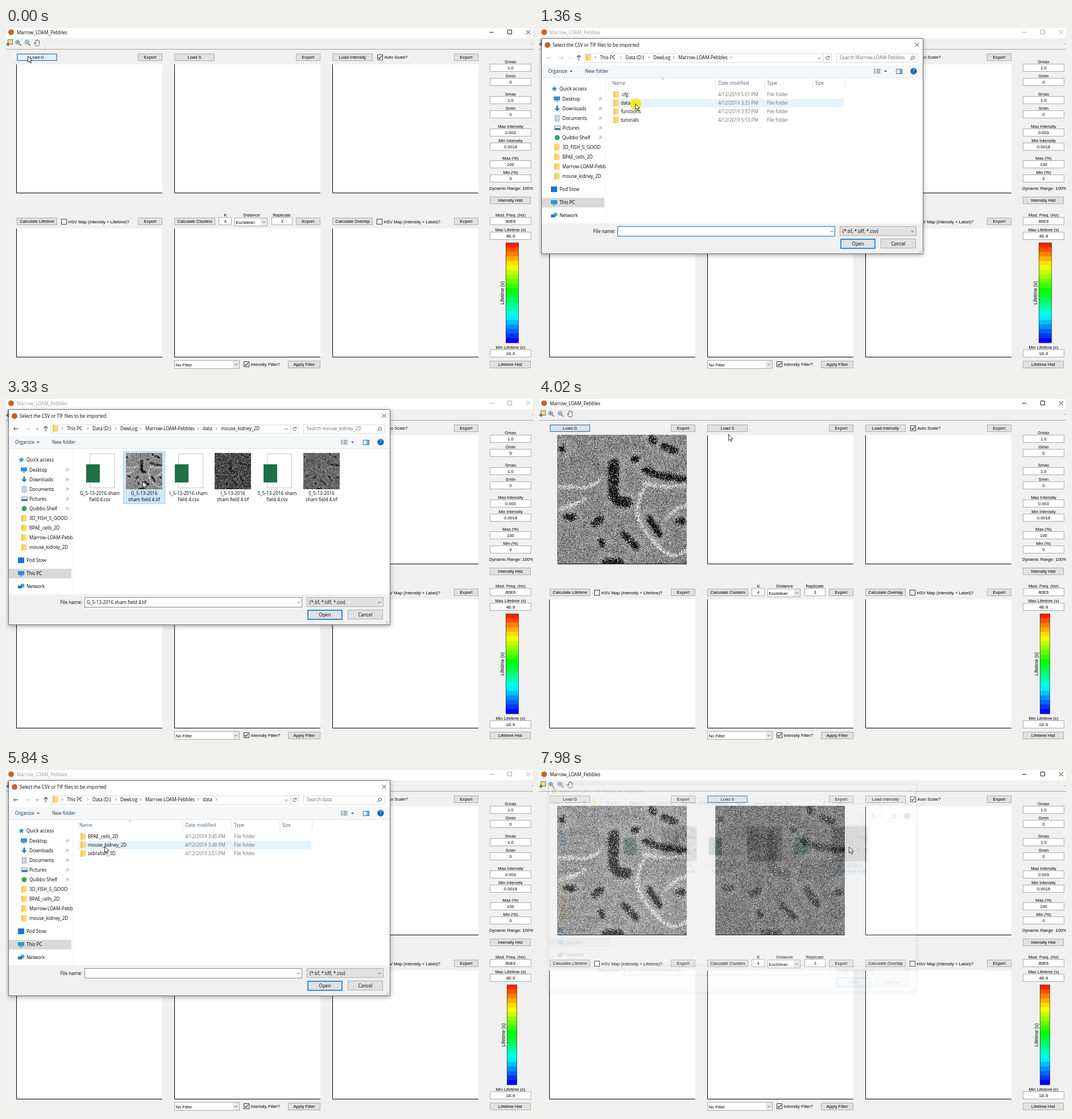
Write an HTML page with a canvas that moves like this. It is 927 px wide and 604 px high and loops after 8000 ms.

```html
<!DOCTYPE html>
<html lang="en">
<head>
<meta charset="utf-8">
<title>Image loader</title>
<style>
html, body { margin: 0; width: 100%; height: 100%; overflow: hidden; background: #f0f0f0; }
#stage { position: relative; width: 927px; height: 604px; overflow: hidden; background: #f0f0f0; }
svg, canvas, #dialog { position: absolute; left: 0; top: 0; }
svg { width: 927px; height: 604px; }
text { white-space: pre; }
.a { font: 7.6px "Liberation Sans", Arial, sans-serif; }
.s { font: 8.1px "Open Sans", "Noto Sans", sans-serif; }
.m { text-anchor: middle; }
.e { text-anchor: end; }
#dialog {
  width: 927px; height: 604px; transform-origin: 340px 208px;
  animation: fade 8s linear infinite, zoom 8s linear infinite;
}
#frame {
  position: absolute; left: 4px; top: 18px; width: 670px; height: 378px;
  background: #fff; border: 1px solid #707070; box-shadow: 0 2px 8px rgba(0,0,0,.35);
}
@keyframes fade {
  0%, 7.25% { opacity: 0 }
  9.75%, 42.625% { opacity: 1 }
  44.75%, 58% { opacity: 0 }
  60.5%, 97.875% { opacity: 1 }
  100% { opacity: .06 }
}
@keyframes zoom {
  0% { transform: scale(.91) }
  7.25%, 58% { transform: scale(.91); animation-timing-function: cubic-bezier(.333,.667,.667,1) }
  9.75%, 42.625%, 60.5%, 97.875% { transform: none }
  44.75% { transform: scale(.96); animation-timing-function: step-end }
  100% { transform: scale(.959) }
}
#pointer { animation: travel 8s ease-in-out infinite; }
@keyframes travel {
  0%, 8.75% { transform: translate(38px,49px) }
  16%, 22.5% { transform: translate(169px,133px) }
  28%, 33% { transform: translate(221px,137px) }
  37%, 45% { transform: translate(240px,145px) }
  49.5%, 50.5% { transform: translate(333px,62px) }
  52.5%, 62.25% { transform: translate(337px,52px) }
  67.5%, 70% { transform: translate(169px,133px) }
  72.5% { transform: translate(173px,134px) }
  84% { transform: translate(173px,134px); animation-timing-function: linear }
  93%, 100% { transform: translate(545px,135px) }
}
</style>
</head>
<body>
<div id="stage">
  <svg id="main"></svg>
  <div id="dialog"><div id="frame"></div><svg id="files"></svg></div>
  <svg><g id="pointer">
    <circle class="click" cx="1" cy="1" r="10" fill="#f3e72a" opacity=".8"/>
    <path d="M.5 .5V11.2L3 8.9 4.7 12.8 6.4 12 4.8 8.3H8.2Z" fill="#fff" stroke="#000" stroke-width=".8"/>
  </g></svg>
</div>
<script>
const $ = id => document.getElementById(id);
const APP = 'Marrow_LOAM_Pebbles', REPO = 'Marrow-LOAM-Pebbles';

// Visibility spans in ms, written as stepped keyframes.
let css = '';
const span = (name, ...on) => {
  const keys = on.map(([a, b]) => `${a / 80}%{opacity:1}` + (b < 8000 ? `${b / 80}%{opacity:0}` : '')).join('');
  css += `@keyframes ${name}{0%{opacity:0}${keys}}.${name}{animation:${name} 8s step-end infinite}`;
};
span('active', [0, 460], [3410, 4400], [7830, 8000]);
span('inactive', [460, 3410], [4400, 7830]);
span('g-hover', [0, 460]);
span('g-focus', [0, 4260]);
span('s-hover', [4120, 5000]);
span('s-focus', [4260, 8000]);
span('g-image', [3500, 8000]);
span('s-image', [7900, 8000]);
span('bar-wide', [0, 3500]);
span('bar-slim', [3500, 8000]);
span('root', [0, 1600], [3650, 5600]);
span('data', [1600, 2560], [5600, 6450]);
span('kidney', [2560, 3650], [6450, 8000]);
span('root-hover', [1200, 1440], [5250, 5480]);
span('root-pick', [1440, 1600], [5480, 5600]);
span('data-hover', [1680, 2280], [5600, 6370]);
span('data-pick', [2280, 2560], [6370, 6450]);
span('typing', [0, 1440], [3650, 5480]);
span('caret', [640, 1000], [4640, 5100]);
span('g-name', [3330, 3650]);
span('s-name', [7750, 8000]);
span('click', [380, 460], [1340, 1600], [2300, 2540], [3180, 3330], [4260, 4340], [5440, 5600], [6370, 6450], [7750, 7830]);

const rect = (x, y, w, h, fill, stroke = 'none', more = '') =>
  `<rect x="${x}" y="${y}" width="${w}" height="${h}" fill="${fill}" stroke="${stroke}" ${more}/>`;
const box = (x, y, w, h, fill, stroke, more) => rect(x + .5, y + .5, w - 1, h - 1, fill, stroke, more);
const text = (x, y, s, cls = 'a', fill = '#000') => `<text x="${x}" y="${y}" class="${cls}" fill="${fill}">${s}</text>`;
const line = (d, stroke = '#000', w = 1) => `<path d="${d}" fill="none" stroke="${stroke}" stroke-width="${w}"/>`;
const dot = (x, y, r, fill) => `<circle cx="${x}" cy="${y}" r="${r}" fill="${fill}"/>`;
const group = (cls, ...parts) => `<g class="${cls}">${parts.join('')}</g>`;
const chevron = (x, y, c = '#444') => line(`M${x - 2.5} ${y - 1.2}l2.5 2.5 2.5 -2.5`, c, .9);

// Main window
const button = (x, y, w, s) => box(x, y, w, 13, '#e1e1e1', '#adadad') + text(x + w / 2, y + 9.4, s, 'a m');
const field = (x, y, w, s) => box(x, y, w, 14, '#fff', '#ababab') + text(x + w / 2, y + 9.7, s, 'a m');
const label = (x, y, s) => text(x, y, s, 'a m');
const check = (x, y, s, on) => box(x, y, 10, 10, '#fff', '#333') +
  (on ? line(`M${x + 2} ${y + 5}l2 2.3 4 -5`, '#111', 1.1) : '') + text(x + 12.5, y + 7.8, s);
const select = (x, y, w, s) => box(x, y, w, 15, '#fff', '#ababab') + text(x + 2.5, y + 10.6, s) +
  rect(x + w - 12, y + 1, 11, 13, '#e9e9e9') + chevron(x + w - 6.5, y + 7.5);
const axes = (x, y) => rect(x, y, 257, 227, '#fff') + line(`M${x + .5} ${y}V${y + 226.5}H${x + 257}`);

const caption = (cls, c) => group(cls, text(19, 11, APP, 's', c),
  line('M850 7.5h7.5M882.5 3.5h7v7h-7zM915 4l7 7m0 -7l-7 7', c, .9));
const focus = (x, name) => group(name + '-hover', rect(x + 1, 46, 69, 11, '#e5f1fb')) +
  group(name + '-focus', box(x, 45, 71, 13, 'none', '#4f86b0') + box(x + 1, 46, 69, 11, 'none', '#8fc3ea'));
const bar = (cls, x, w, tx) => {
  let s = '';
  for (let i = 0; i < 22; i++) s += rect(x, 378 + i * 8, w, 8.2, `hsl(${8 + i * 11},100%,50%)`);
  return group(cls, s, box(x, 378, w, 177, 'none', '#333', 'stroke-width=".7"'),
    `<text transform="translate(${tx} 466.5) rotate(-90)" class="a m" style="font-size:8.3px">Lifetime (s)</text>`);
};
const lens = (x, sign) => `<circle cx="${x}" cy="25" r="3.4" fill="#dcecf8" stroke="#4a6e92"/>` +
  line(`M${x + 2.5} 27.6l3.7 3.6`, '#a8733a', 1.8) + line(`M${x - 2} 25h4` + sign, '#246', .9);

let ui = rect(0, 0, 927, 18, '#fff') + dot(9, 7.5, 5, '#c4622d') + caption('active', '#000') + caption('inactive', '#999') +
  rect(0, 37, 927, 1, '#a6a6a6') +
  box(3, 20, 9, 9, '#f6d98c', '#8a7440') + line('M0 28.5h7M3.5 25v7', '#222', 1.2) +
  lens(20.5, 'm-2 -2v4') + lens(37, '') +
  '<path d="M52 31l-2.5 -5 1.5 -.5 1.5 2v-5.5h1.4v-1h1.5v.8h1.5v1h1.5v6l-1.4 3z" fill="#fff" stroke="#333" stroke-width=".8"/>' +
  line('M925.5 27.5h1.5', '#333');
for (const x of [18, 296, 574]) ui += axes(x, 64) + axes(x, 353);
ui += button(19, 45, 71, '') + button(296, 45, 71, '') + focus(19, 'g') + focus(296, 's') +
  label(54.5, 54.4, 'Load G') + label(331.5, 54.4, 'Load S') + button(574, 45, 71, 'Load Intensity') +
  check(653, 46.5, 'Auto Scale?', true);
for (const x of [232, 510, 788]) ui += button(x, 45, 43, 'Export') + button(x, 334, 43, 'Export');
ui += button(19, 334, 71, 'Calculate Lifetime') + check(97, 336, 'HSV Map (Intensity + Lifetime)?') +
  button(296, 334, 72, 'Calculate Clusters') + label(386, 332, 'K') + field(374, 333, 23, 4) +
  label(432, 332, 'Distance') + select(402, 334, 58, 'Euclidean') + label(485, 332, 'Replicate') + field(467, 333, 37, 3) +
  button(574, 334, 71, 'Calculate Overlap') + check(652, 336, 'HSV Map (Intensity + Label)?') +
  select(296, 585, 115, 'No Filter') + check(418, 587, 'Intensity Filter?', true) + button(496, 586, 57, 'Apply Filter');
[['Gmax', '1.0', 63], ['Gmin', '0', 88], ['Smax', '1.0', 120], ['Smin', '0', 145],
 ['Max Intensity', '0.003', 177], ['Min Intensity', '0.0018', 202], ['Max (%)', '100', 233], ['Min (%)', '0', 258],
 ['Mod. Freq. (Hz)', '80E6', 333], ['Max Lifetime (s)', '4E-9', 359], ['Min Lifetime (s)', '1E-9', 566]
].forEach(([s, v, y]) => ui += label(887.5, y - 1.5, s) + field(851, y, 73, v));
ui += text(850, 285, 'Dynamic Range: 100%') + button(851, 297, 72, 'Intensity Hist') + button(851, 586, 72, 'Lifetime Hist') +
  bar('bar-wide', 879, 23, 875.5) + bar('bar-slim', 881, 18, 878);
const loaded = (cls, x) => group(cls, rect(x, 63, 257, 229, '#f0f0f0'), line(`M${x + 15} 64V290.5H${x + 242}`));
$('main').innerHTML = ui + loaded('g-image', 18) + loaded('s-image', 296);

// File dialog
const folder = (x, y) => rect(x, y - 5.5, 9.5, 11, '#ffd978') + rect(x, y - 5.5, 3, 11, '#f3c454');
const say = (x, y, s, c) => text(x, y + 3, s, 's', c);
const next = x => line(`M${x} 50l2 2 -2 2`, '#555', .8);
const GREY = '#6d6d6d';
const pin = y => line(`M105 ${y + 3.5}l3 -3m-2 -2l4 4m-2.5 -5.5l4 4m-2.5 -3.5l-2 2.5`, '#8a96a3', .9);
const screen = (y, x) => rect(x, y - 4, 11, 7, '#2f8fdd') + rect(x + 3, y + 4, 5, 1, '#467');

const side = [
  ['Quick access', 107, y => `<path d="M27 ${y - 5}l1.4 3.3 3.6 .3 -2.7 2.4 .8 3.5 -3.1 -1.9 -3.1 1.9 .8 -3.5 -2.7 -2.4 3.6 -.3z" fill="#2f8fdd"/>`],
  ['Desktop', 124.5, y => screen(y, 26)],
  ['Downloads', 141.5, y => line(`M32 ${y - 5}v7`, '#2878c8', 3) + `<path d="M27 ${y}h10l-5 5z" fill="#2878c8"/>`],
  ['Documents', 158.5, y => box(28, y - 5, 8, 11, '#fff', '#7a8b99') + line(`M30 ${y - 2}h4m-4 2.5h4m-4 2.5h4`, '#3a88c8', .9)],
  ['Pictures', 176, y => box(27, y - 4, 11, 8, '#e8f4fc', '#7a8b99') + rect(28, y, 9, 3, '#3b7fae')],
  ['Quibbo Shelf', 193, y => dot(32, y, 4.5, '#34a853')],
  ['3D_FISH_5_GOOD', 210], ['BPAE_cells_2D', 227], [REPO.slice(0, 16), 244], ['mouse_kidney_2D', 261],
  ['Pod Stow', 284, y => rect(21, y - 5, 11, 10, '#1a78c8')],
  ['This PC', 307, y => screen(y, 21)],
  ['Network', 329.5, y => dot(29, y - 1, 3.5, '#4aa3dc') + rect(21, y - 1, 7, 5, '#2c6fa8')]
];
let dlg = rect(5, 65, 670, 22, '#f5f6f7') + rect(5, 87, 670, 1, '#e3e4e6') + rect(5, 344, 670, 53, '#f0f0f0') +
  dot(15, 30, 5, '#c4622d') + say(24, 29.8, 'Select the CSV or TIF files to be imported') +
  line('M661.5 26l7 7m0 -7l-7 7', '#222', .9) +
  line('M34 52.5h8m-3 -3l3 3 -3 3', '#c8c8c8') + line('M70 57v-9m-3.5 3.5l3.5 -3.5 3.5 3.5', '#444', 1.1) +
  box(79, 45, 436, 16, '#fff', '#d9d9d9') + line('M500.5 45v15', '#d9d9d9') + chevron(493, 53) +
  line('M510.3 51a3 3 0 1 0 .3 2.7m0 -4.5v2.2h-2.2', '#444', .9) +
  box(523, 45, 144, 16, '#fff', '#d9d9d9') +
  '<circle cx="658" cy="52" r="2.5" fill="none" stroke="#444" stroke-width=".9"/>' + line('M656 54l-3 3', '#444') +
  folder(82, 52) + next(98) + say(107, 52, 'This PC') + next(143) + say(152, 52, 'Data (D:)') + next(192) +
  say(201, 52, 'DewLog') + next(236) + say(245, 52, REPO) + next(337) +
  say(16, 76, 'Organize', '#1e2f4d') + '<path d="M54 75h5l-2.5 2.8zM607 75h5l-2.5 2.8z" fill="#345"/>' + say(81, 76, 'New folder', '#1e2f4d') +
  line('M589 73h3m1.5 0h7M589 76h3m1.5 0h7M589 79h3m1.5 0h7', '#6c7f90', 1.5) +
  box(628, 72, 11, 9, '#fff', '#4a6a88') + rect(634, 73, 4, 7, '#6db4ec') +
  dot(659, 76, 5.7, '#1068b8') + text(659, 79, '?', 's m', '#fff') +
  rect(5, 299, 110, 17, '#d9d9d9') + rect(117, 88, 1, 256, '#f4f4f4');
side.forEach(([s, y, icon], i) => {
  dlg += (icon ? icon(y) : folder(27, y)) + say(i && i < 10 ? 41 : 36, y, s) + (i > 0 && i < 6 ? pin(y) : '');
});
dlg += text(134, 361, 'File name:', 's e') + box(138, 349, 383, 18, '#fff', '#8a8a8a') +
  group('typing', box(138, 349, 383, 18, 'none', '#0078d7')) + group('caret', line('M142.5 352v11')) + chevron(515, 358) +
  group('g-name', say(142, 358, 'G_5-13-2016 sham field 4.tif')) + group('s-name', say(142, 358, 'S_5-13-2016 sham field 4.tif')) +
  box(529, 349, 135, 17, '#e1e1e1', '#adadad') + say(534, 358, '(*.tif, *.tiff, *.csv)') + chevron(657, 358) +
  rect(531, 372, 60, 16, '#e1e1e1', '#0078d7', 'stroke-width="1.6"') + text(561, 382.5, 'Open', 's m') +
  box(601, 371, 62, 17, '#e1e1e1', '#adadad') + text(632, 382.5, 'Cancel', 's m') +
  line('M668 396l5 -5m-2.5 5l2.5 -2.5', '#aaa');

const HOVER = '#e5f3ff', PICK = '#cce8ff';
const table = (name, rows) => group(name,
  line('M215.5 91l2.5 -2.5 2.5 2.5', '#777', .8), line('M310.5 88v18M396.5 88v18M481.5 88v18M538.5 88v18', '#e5e5e5'),
  say(129, 97, 'Name', '#4c607a'), say(315.5, 97, 'Date modified', '#4c607a'), say(401, 97, 'Type', '#4c607a'), say(486, 97, 'Size', '#4c607a'),
  group(name + '-hover', rect(127, 125, 409, 15, HOVER)),
  group(name + '-pick', box(127, 125, 409, 15, PICK, '#99d1ff')),
  rows.map(([s, time], i) => {
    const y = 117 + i * 15;
    return folder(131, y) + say(144, y, s) + say(315, y, `4/12/2019 ${time} PM`, GREY) + say(401, y, 'File folder', GREY);
  }).join(''));
const back = c => line('M21.5 52.5h-8m3 -3l-3 3 3 3', c) + chevron(55, 52.5, c);
const find = s => say(529, 52, 'Search ' + s, GREY);
dlg += group('root', back('#c8c8c8'), find(REPO)) +
  table('root', [['.cfg', '5:01'], ['data', '3:25'], ['functions', '3:57'], ['tutorials', '5:13']]) +
  group('data', back('#444'), say(346, 52, 'data'), next(369), find('data')) +
  table('data', [['BPAE_cells_2D', '3:45'], ['mouse_kidney_2D', '3:48'], ['zebrafish_3D', '3:51']]);

const sweep = x => 6720 + (x - 173) / 372 * 720;
let icons = back('#444') + say(346, 52, 'data') + next(369) + say(378, 52, 'mouse_kidney_2D') + find('mouse_kidney_2D');
[...'GIS'].forEach((c, k) => ['csv', 'tif'].forEach((ext, j) => {
  const i = k * 2 + j, x = 128 + i * 78, mid = x + 37;
  const pass = [Math.max(6450, sweep(x)), i < 5 ? sweep(x + 78) : 7750];
  span('item' + i, ...(i === 1 ? [[2560, 3200]] : []), pass);
  icons += group('item' + i, rect(x, 92, 74, 93, HOVER));
  if (i === 1) { span('pick1', [3200, 3650]); icons += group('pick1', box(x, 92, 74, 93, PICK, '#99d1ff')); }
  if (i === 5) { span('pick5', [7750, 8000]); icons += group('pick5', box(x, 92, 74, 93, PICK, '#99d1ff')); }
  if (!j) icons += box(mid - 18, 96, 44, 61, '#fff', '#c4c4c4') + rect(mid - 24, 115, 24, 32, '#1d7145');
  const [a, b] = j ? ['', 'sham '] : [' sham', ''];
  icons += text(mid, 169, `${c}_5-13-2016${a}`, 's m') + text(mid, 180, `${b}field 4.${ext}`, 's m');
}));
$('files').innerHTML = dlg + group('kidney', icons);

// Grainy tissue pictures: strokes in flat tones, scattered and speckled by seeded noise.
const TUBES = new Path2D('M98 51V105Q105 121 122 119');
const SPOTS = new Path2D('M7 25h1M135 42h3M154 62Q175 75 225 78M75 148L64 157M17 145h10M76 188l2 4M117 176L138 197' +
  'M160 146L178 175M165 6l4 6M187 20L206 28M213 152h6M84 224h26');
const STREAKS = new Path2D('M0 92H30Q55 98 75 78M155 90Q125 135 155 172T200 212T227 202M227 124Q195 135 190 150' +
  'M150 84Q190 97 227 88M47 112Q30 125 0 132');
const SEAMS = new Path2D('M30 0Q60 60 85 60M95 20Q150 10 160 50T227 50M40 227Q60 190 100 205' +
  'M110 227Q100 160 130 137M0 180Q40 190 50 160T100 130M210 227Q225 190 190 140M0 50Q50 30 90 70');

const canvas = (parent, before, cls, x, y, n) => {
  const c = document.createElement('canvas');
  c.width = c.height = n;
  c.className = cls;
  c.style.cssText = `left:${x}px;top:${y}px`;
  parent.insertBefore(c, before);
  return c;
};
const tissue = (c, base, tube, spot, streak, seed) => {
  const g = c.getContext('2d', { willReadFrequently: true }), n = 227;
  const rnd = () => (seed = seed * 16807 % 2147483647) / 2147483647;
  const ink = (path, w, v) => { g.lineWidth = w; g.strokeStyle = `rgb(${v},${v},${v})`; g.stroke(path); };
  g.lineCap = g.lineJoin = 'round';
  g.fillStyle = `rgb(${base},${base},${base})`;
  g.fillRect(0, 0, n, n);
  ink(TUBES, 40, base + 12);
  ink(SPOTS, 34, base + 12);
  ink(SEAMS, 7, base - 22);
  ink(SEAMS, 1.5, base + 40);
  ink(STREAKS, 4, streak);
  ink(TUBES, 18, tube);
  ink(SPOTS, 12, spot);
  const img = g.getImageData(0, 0, n, n), d = img.data, tone = d.slice();
  const near = v => Math.max(0, Math.min(n - 1, Math.round(v + (rnd() + rnd() - 1) * 5)));
  for (let y = 0, i = 0; y < n; y++) for (let x = 0; x < n; x++, i += 4) {
    const t = tone[(near(y) * n + near(x)) * 4], dark = t < 75;
    let v = t + (rnd() + rnd() + rnd() - 1.5) * (dark ? 35 : 65);
    if (dark && rnd() < .14) v = 90 + rnd() * 165;
    else if (rnd() < .06) v += rnd() < .65 ? -85 : 85;
    d[i] = d[i + 1] = d[i + 2] = v;
  }
  g.putImageData(img, 0, 0);
  return c;
};
const G = tissue(canvas($('stage'), $('dialog'), 'g-image', 33, 63, 227), 138, 18, 18, 228, 11);
const S = tissue(canvas($('stage'), $('dialog'), 's-image', 311, 63, 227), 102, 74, 38, 128, 29);
const I = document.createElement('canvas');
I.width = I.height = 227;
tissue(I, 60, 20, 20, 30, 47);
[G, I, S].forEach((pic, k) =>
  canvas($('dialog'), null, 'kidney', 211 + k * 156, 95, 64).getContext('2d').drawImage(pic, 0, 0, 64, 64));

const sheet = document.createElement('style');
sheet.textContent = css;
document.head.append(sheet);
</script>
</body>
</html>
```
